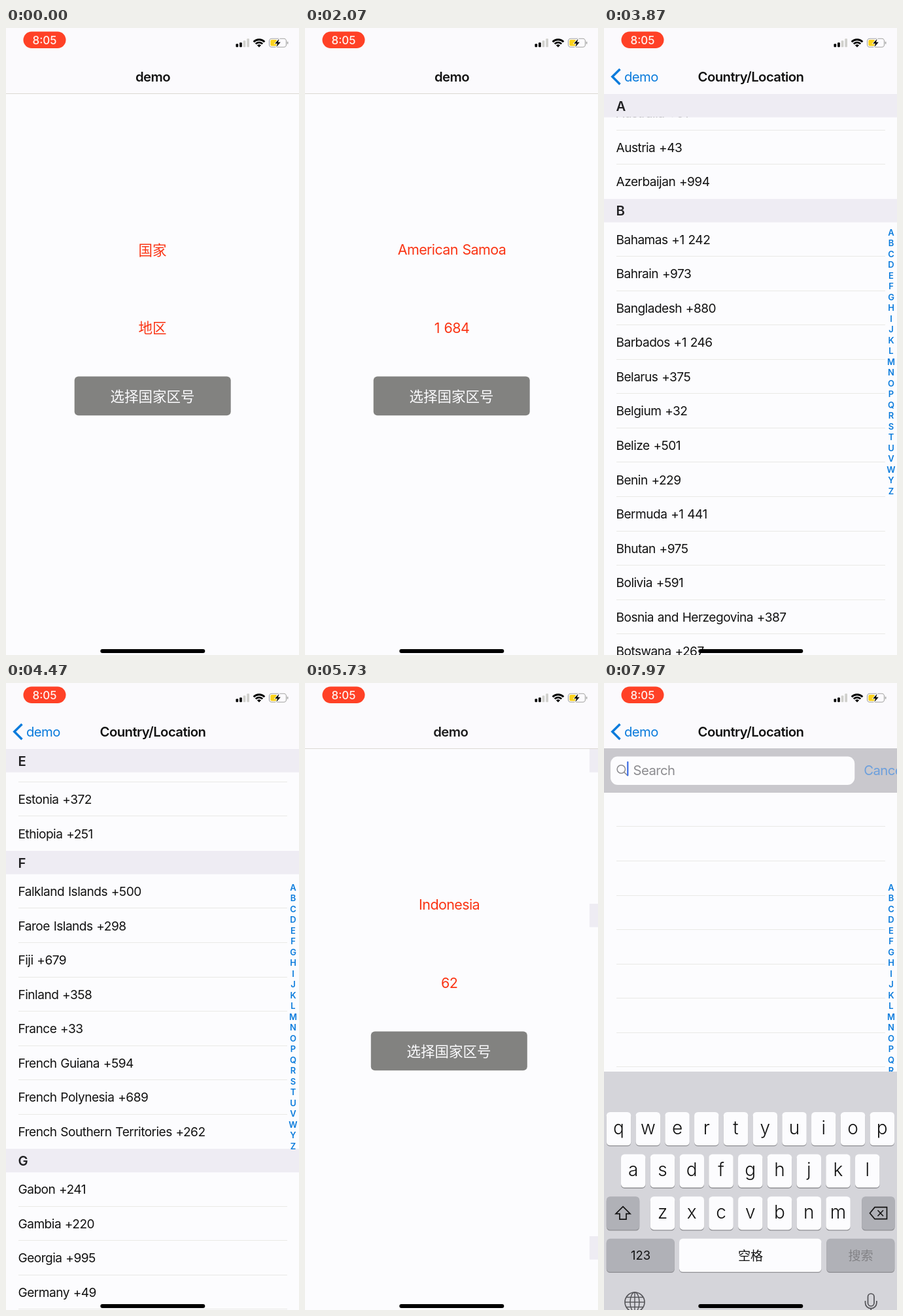
Animation, 448 px wide and 960 px high, one loop 8 s. Source, as an HTML page with a canvas:

```html
<!DOCTYPE html>
<html lang="zh-CN">
<head>
<meta charset="utf-8">
<title>demo</title>
<style>
html, body { margin: 0; width: 100%; height: 100%; overflow: hidden; background: #fcfcfe; }
canvas { display: block; width: 100vw; height: 100vh; }
</style>
</head>
<body>
<canvas id="stage" width="448" height="960"></canvas>
<script>
const ctx = document.getElementById('stage').getContext('2d');
const W = 448, H = 960, LOOP = 8000, STEP = 1000 / 30;
const PT = W / 375;
const TOP = 101, ROW = 44 * PT, HEAD = 30 * PT, SEARCH = 56 * PT;

const PAPER = '#fcfcfe', INK = '#121212', BLUE = '#0a7bdc', RED = '#fa3414', MUTED = '#8c8c90';
const LATIN = 'Inter, Roboto, sans-serif';
const HAN = '"Noto Sans CJK SC", "Noto Sans CJK", sans-serif';

const COUNTRIES = {
  A: 'Afghanistan +93|Albania +355|Algeria +213|American Samoa +1 684|Andorra +376|Angola +244|Anguilla +1 264|Antigua and Barbuda +1 268|Argentina +54|Armenia +374|Aruba +297|Australia +61|Austria +43|Azerbaijan +994',
  B: 'Bahamas +1 242|Bahrain +973|Bangladesh +880|Barbados +1 246|Belarus +375|Belgium +32|Belize +501|Benin +229|Bermuda +1 441|Bhutan +975|Bolivia +591|Bosnia and Herzegovina +387|Botswana +267|Brazil +55|British Virgin Islands +1 284|Brunei +673|Bulgaria +359|Burkina Faso +226|Burundi +257',
  C: 'Cambodia +855|Cameroon +237|Canada +1|Cape Verde +238|Cayman Islands +1 345|Central African Republic +236|Chad +235|Chile +56|China +86|Colombia +57|Comoros +269|Congo +242|Cook Islands +682|Costa Rica +506|Croatia +385|Cuba +53|Cyprus +357|Czech Republic +420',
  D: 'Denmark +45|Djibouti +253|Dominica +1 767|Dominican Republic +1 809',
  E: 'Ecuador +593|Egypt +20|El Salvador +503|Equatorial Guinea +240|Eritrea +291|Estonia +372|Ethiopia +251',
  F: 'Falkland Islands +500|Faroe Islands +298|Fiji +679|Finland +358|France +33|French Guiana +594|French Polynesia +689|French Southern Territories +262',
  G: 'Gabon +241|Gambia +220|Georgia +995|Germany +49|Ghana +233|Gibraltar +350|Greece +30|Greenland +299|Grenada +1 473|Guadeloupe +590|Guam +1 671|Guatemala +502|Guinea +224|Guinea-Bissau +245|Guyana +592',
  H: 'Haiti +509|Honduras +504|Hong Kong +852|Hungary +36',
  I: 'Iceland +354|India +91|Indonesia +62|Iran +98|Iraq +964|Ireland +353|Isle of Man +44|Israel +972|Italy +39',
  J: 'Jamaica +1 876|Japan +81|Jordan +962'
};

// Sections with their place inside the scrolled content
const sections = [];
let contentY = SEARCH;
for (const [letter, names] of Object.entries(COUNTRIES)) {
  const rows = names.split('|');
  const height = HEAD + rows.length * ROW;
  sections.push({ letter, rows, y: contentY, height });
  contentY += height;
}
const sectionY = letter => sections.find(s => s.letter === letter).y;

// ---- timing ----
const PUSH = [400, 2450, 6200], POP = [1450, 5348];
const TYPING = 7663;
const clamp = v => Math.max(0, Math.min(1, v));
const smooth = u => u * u * (3 - 2 * u);

function spring(ms, speed = 14) {
  if (ms <= 0) return 0;
  if (ms >= 610) return 1;
  const x = speed * ms / 1000;
  return 1 - (1 + x) * Math.exp(-x);
}

// 0 = start page, 1 = list page
function pageProgress(t) {
  const total = starts => starts.reduce((sum, s) => sum + spring(t - s), 0);
  return clamp(total(PUSH) - total(POP));
}

const FIRST = 678, MID = sectionY('F') - 156, LAST = sectionY('I') - 237;
const MID_TIME = 134 * STEP, STOP = 5150;
const glideSpan = (LAST - MID) / (1 - Math.exp((MID_TIME - STOP) / 500));
const glide = t => MID + glideSpan * (1 - Math.exp((MID_TIME - t) / 500));

function scrollAt(t) {
  if (t < 3250 || t > 6100) return 0;
  if (t < 3860) return FIRST * (1 - (1 - (t - 3250) / 610) ** 3);
  if (t < 3990) return FIRST;
  if (t < 4070) return FIRST + (glide(4070) - FIRST) * ((t - 3990) / 80) ** 2;
  return t < STOP ? glide(t) : LAST;
}

// ---- drawing helpers ----
function text(str, x, y, size, color, { weight = 400, align = 'left', family = LATIN, track = -0.028, alpha = 1 } = {}) {
  const han = family === HAN;
  ctx.save();
  ctx.globalAlpha *= alpha;
  ctx.font = `${weight} ${size}px ${family}`;
  ctx.letterSpacing = `${han ? 0 : size * track}px`;
  ctx.wordSpacing = `${size * 0.05}px`;
  ctx.textAlign = align;
  ctx.fillStyle = color;
  ctx.fillText(str, x, y + size * (han ? 0.38 : 0.36));
  ctx.restore();
}

function rect(x, y, w, h, color, r = 0) {
  ctx.fillStyle = color;
  ctx.beginPath();
  ctx.roundRect(x, y, w, h, r);
  ctx.fill();
}

function line(points, color, width, close) {
  ctx.strokeStyle = color;
  ctx.lineWidth = width;
  ctx.beginPath();
  points.forEach(([x, y]) => ctx.lineTo(x, y));
  if (close) ctx.closePath();
  ctx.stroke();
}

function ring(x, y, rx, ry, color, width) {
  ctx.strokeStyle = color;
  ctx.lineWidth = width;
  ctx.beginPath();
  ctx.ellipse(x, y, rx, ry, 0, 0, Math.PI * 2);
  ctx.stroke();
}

// ---- start page ----
function drawHome(t) {
  const size = 18 * PT, mid = { align: 'center' }, han = { align: 'center', family: HAN };
  rect(0, TOP, W, H - TOP, PAPER);
  if (t < POP[0]) {
    text('国家', 224, 339.5, size, RED, han);
    text('地区', 224, 459, size, RED, han);
  } else {
    const second = t >= POP[1];
    text(second ? 'Indonesia' : 'American Samoa', 224.5, 339.5, size, RED, mid);
    text(second ? '62' : '1 684', 224.5, 459, size, RED, mid);
  }
  rect(104.7, 533.5, 239, 59.7, '#828280', 6);
  text('选择国家区号', 224, 563.5, size, PAPER, han);
}

// ---- list page ----
function drawHeader(letter, y) {
  rect(0, y, W, HEAD, '#eeecf3');
  text(letter, 18.5, y + HEAD / 2 + 0.5, 17 * PT, '#222224', { weight: 600 });
}

function separator(y) {
  rect(19, Math.round(y) - 1, 411, 1, '#e9e9e6');
}

function drawSections(scroll) {
  const shift = TOP - scroll;
  const visible = sections.filter(s => s.y + shift <= H && s.y + s.height + shift >= TOP);
  for (const s of visible) {
    s.rows.forEach((name, i) => {
      const y = s.y + shift + HEAD + i * ROW;
      if (y > H || y + ROW < TOP) return;
      text(name, 18.5, y + ROW / 2, 16 * PT, INK);
      if (i < s.rows.length - 1) separator(y + ROW);
    });
  }
  for (const s of visible) {
    const y = s.y + shift;
    drawHeader(s.letter, Math.min(Math.max(y, TOP), y + s.height - HEAD));
  }
}

function drawSearch(y, typing, cancel) {
  rect(0, y - 1, W, SEARCH + 1, '#c9c8cd');
  const right = 421 - 67 * cancel;
  rect(10, y + 11.5, right - 10, 43.5, PAPER, 11);
  ring(26.3, y + 31, 6.2, 6.2, MUTED, 1.5);
  line([[30.8, y + 35.5], [36, y + 40.8]], MUTED, 1.6);
  text('Search', 44.5, y + 32.5, 17 * PT, MUTED);
  if (typing) {
    rect(35.2, y + 19, 2.2, 22.5, '#3a6ae4', 1);
    text('Cancel', right + 14, y + 32.5, 17 * PT, '#4a90e2', { alpha: Math.min(1, cancel * 1.3) });
  }
}

function drawList(t) {
  const typing = t >= TYPING;
  const scroll = scrollAt(t);
  rect(0, TOP - 1, W, H, PAPER);
  if (typing) {
    for (let y = TOP + SEARCH + ROW; y < H; y += ROW) separator(y);
  } else {
    drawSections(scroll);
  }
  if (scroll < SEARCH) drawSearch(TOP - scroll, typing, smooth(clamp((t - TYPING) / 560)));
  [...'ABCDEFGHIJKLMNOPQRSTUVWYZ'].forEach((c, i) =>
    text(c, 439, 313.3 + i * 16.49, 13, BLUE, { weight: 600, align: 'center', track: 0 }));
}

// ---- bars ----
function drawNav(p) {
  const size = 17 * PT;
  rect(0, 0, W, TOP - 1, '#fbfafd');
  if (p < 1) {
    ctx.globalAlpha = 1 - p;
    rect(0, TOP - 1, W, 1, '#dcd8d2');
    ctx.globalAlpha = 1;
    text('demo', 224.5 - 60 * p, 74.5, size, INK, { weight: 600, align: 'center', alpha: (1 - p) ** 1.5 });
  }
  if (p > 0) {
    const fade = p * p;
    text('Country/Location', 224.5 + 150 * (1 - p), 74.5, size, INK, { weight: 600, align: 'center', alpha: fade });
    text('demo', 31 + 110 * (1 - p), 74.5, size, BLUE, { alpha: fade });
    ctx.globalAlpha = fade;
    line([[24.5, 63], [12.8, 74.6], [24.5, 86.2]], BLUE, 3.5);
    ctx.globalAlpha = 1;
  }
}

function drawStatus() {
  rect(26.5, 5.5, 65, 25.5, '#ff4126', 12.75);
  text('8:05', 59, 18.7, 17, '#fff4f0', { weight: 500, align: 'center', track: 0 });

  [5, 7, 10, 13].forEach((h, i) =>
    rect(351.5 + i * 5.6, 29.3 - h, 3.7, h, i < 2 ? '#000' : '#d0d0cc', 1));

  // Wi-Fi fan
  ctx.strokeStyle = '#000';
  const wave = (r, width) => {
    ctx.lineWidth = width;
    ctx.beginPath();
    ctx.arc(387, 29.5, r, -Math.PI * 0.75, -Math.PI * 0.25);
    ctx.stroke();
  };
  wave(11.8, 2.9);
  wave(7.4, 2.7);
  wave(2.2, 4.2);

  // Battery
  ctx.strokeStyle = '#a4a4a2';
  ctx.lineWidth = 1.1;
  ctx.beginPath();
  ctx.roundRect(402.5, 16.3, 26, 13, 3.8);
  ctx.stroke();
  rect(404.3, 18.1, 10, 9.4, '#fbd21c', 2);
  rect(429.8, 20.8, 1.6, 4, '#a4a4a2', 1);
  ctx.beginPath();
  [[417.5, 16.8], [411.2, 23.8], [415, 23.8], [413.4, 29], [419.8, 21.8], [416, 21.8]]
    .forEach(([x, y]) => ctx.lineTo(x, y));
  ctx.closePath();
  ctx.lineWidth = 1.6;
  ctx.strokeStyle = PAPER;
  ctx.stroke();
  ctx.fillStyle = '#000';
  ctx.fill();
}

// ---- keyboard ----
function key(x, y, w, color) {
  rect(x, y + 1.3, w, 51, '#8e8e92', 5.5);
  rect(x, y, w, 51, color, 5.5);
}

function drawKeyboard(top) {
  const GREY = '#b0b1b7', pitch = 44.75, rowPitch = 64.6, y0 = top + 62;
  rect(0, top, W, H - top + 10, '#d5d5da');
  ['qwertyuiop', 'asdfghjkl', 'zxcvbnm'].forEach((row, r) => {
    const x0 = [3.8, 26, 70.8][r], y = y0 + r * rowPitch;
    [...row].forEach((c, i) => {
      const x = x0 + i * pitch;
      key(x, y, 37.5, PAPER);
      text(c, x + 18.75, y + 23.8, 28, INK, { weight: 300, align: 'center', track: 0 });
    });
  });

  const y2 = y0 + 2 * rowPitch, y3 = y0 + 3 * rowPitch;
  key(3.8, y2, 50.4, GREY);
  key(394.2, y2, 50.4, GREY);
  const cy = y2 + 25.5;
  line([[29, cy - 10], [40, cy + 1], [34, cy + 1], [34, cy + 9.5], [24, cy + 9.5], [24, cy + 1], [18, cy + 1]], INK, 1.7, true);
  line([[406.5, cy], [414, cy - 9], [432.5, cy - 9], [432.5, cy + 9], [414, cy + 9]], INK, 1.7, true);
  line([[418.5, cy - 4.5], [427, cy + 4.5]], INK, 1.6);
  line([[427, cy - 4.5], [418.5, cy + 4.5]], INK, 1.6);

  key(3.8, y3, 104, GREY);
  key(115, y3, 217.5, PAPER);
  key(340.3, y3, 104, GREY);
  text('123', 56, y3 + 25.5, 18.5, INK, { align: 'center', track: 0 });
  text('空格', 224, y3 + 26, 19.1, INK, { align: 'center', family: HAN });
  text('搜索', 392.5, y3 + 26, 19.1, '#828286', { align: 'center', family: HAN });

  // Globe and microphone
  const gy = top + 353, tone = '#525256';
  ring(47, gy, 15, 15, tone, 1.6);
  ring(47, gy, 7, 15, tone, 1.4);
  line([[47, gy - 15], [47, gy + 15]], tone, 1.4);
  line([[32, gy], [62, gy]], tone, 1.4);
  for (const side of [-1, 1]) line([[34.5, gy + side * 7.5], [59.5, gy + side * 7.5]], tone, 1.4);
  ctx.lineWidth = 1.7;
  ctx.beginPath();
  ctx.roundRect(403.5, gy - 13, 9.5, 19, 4.75);
  ctx.stroke();
  ctx.beginPath();
  ctx.moveTo(399.5, gy - 2);
  ctx.lineTo(399.5, gy + 1);
  ctx.arc(408.2, gy + 1, 8.7, Math.PI, 0, true);
  ctx.lineTo(416.9, gy - 2);
  ctx.stroke();
  line([[408.2, gy + 10], [408.2, gy + 15]], tone, 1.7);
}

function draw(t) {
  const p = pageProgress(t);
  rect(0, 0, W, H, PAPER);
  if (p < 1) {
    ctx.save();
    ctx.translate(-0.3 * W * p, 0);
    drawHome(t);
    ctx.restore();
  }
  if (p > 0) {
    ctx.save();
    ctx.translate(W * (1 - p), 0);
    drawList(t);
    ctx.restore();
  }
  drawNav(p);
  drawStatus();
  if (t >= TYPING) drawKeyboard(966 - 401 * spring(t - TYPING));
  rect(144.3, 951, 160, 6, '#000', 3);
}

// Thirty pictures a second, each held until the next;
// the small lead covers times rounded to 10 ms
function tick() {
  const t = performance.now() % LOOP;
  draw(Math.floor((t + 4) / STEP) * STEP);
  requestAnimationFrame(tick);
}
tick();
</script>
</body>
</html>
```
